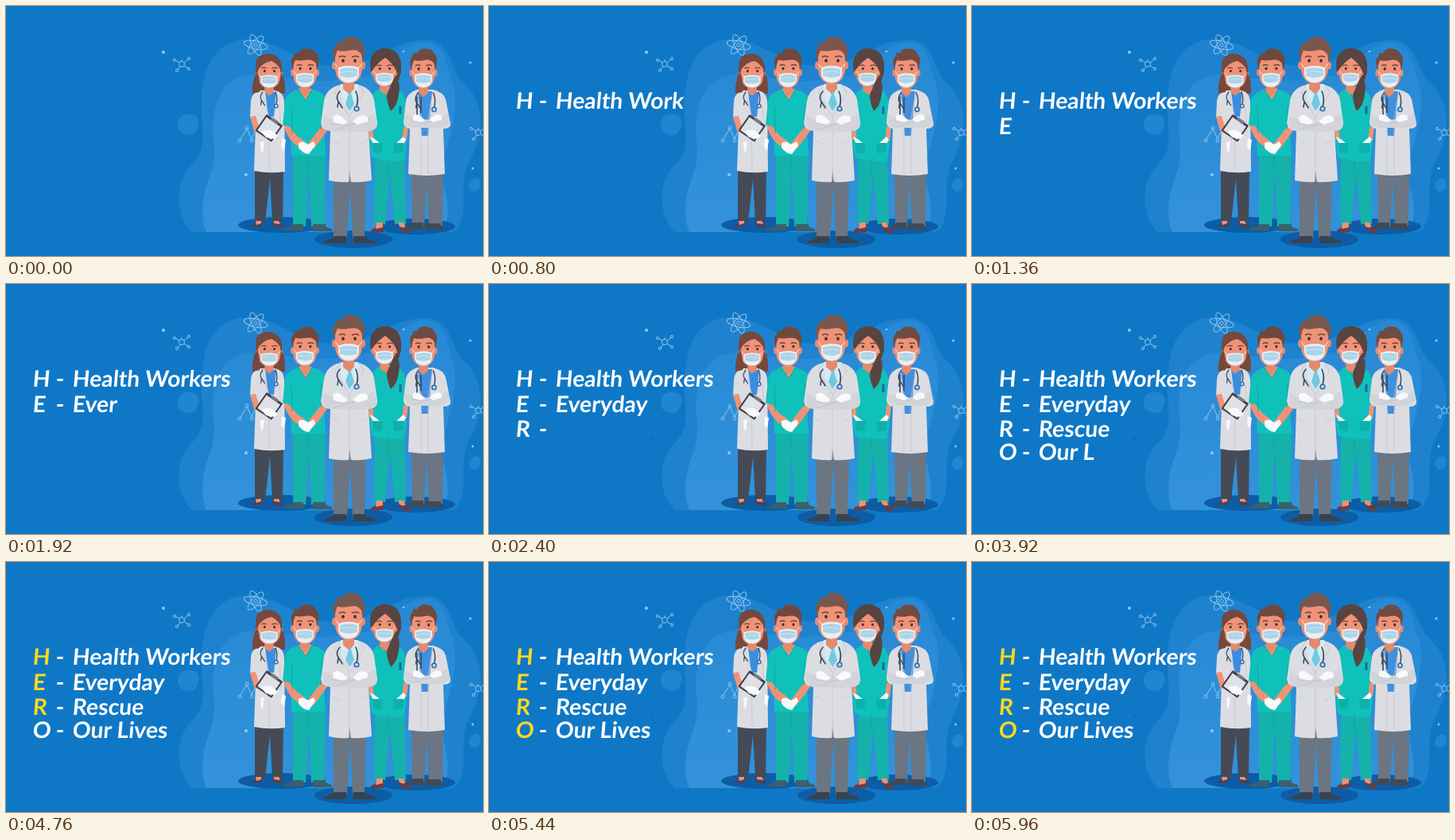
An HTML page that plays this animation: 600x314 px, repeating every 6 s.

```html
<!DOCTYPE html>
<html lang="en">
<head>
<meta charset="utf-8">
<title>Health Workers</title>
<style>
html, body { margin: 0; width: 100%; height: 100%; overflow: hidden; background: #0f78c6; }
svg { display: block; width: 100vw; height: 100vh; }
#lines { font: bold 28.4px Lato, "Open Sans", sans-serif; fill: #fff; }
.skin { fill: #f09277; }
.coat { fill: #dcdde2; }
.fold { fill: #d2d4da; }
.teal { fill: #10c1bb; }
.trouser { fill: #14b2ab; }
.grey { fill: #6c7582; }
.dark { fill: #454a57; }
.glove { fill: #f8f9fb; }
.line { fill: none; stroke: #8fc5ec; stroke-width: 1; }
.scope { fill: none; stroke: #34495f; stroke-width: 1.6; stroke-linecap: round; }
.seam { fill: none; stroke: #c3c5ce; stroke-width: .8; }
.crease { fill: none; stroke: #0da5a0; stroke-width: .9; }
</style>
</head>
<body>
<svg viewBox="0 0 600 314">
<defs>
  <g id="mask">
    <path d="M-13 41Q0 36 13 41V50Q10 60 0 60Q-10 60 -13 50Z" fill="#e6f0f5"/>
    <path d="M-11 43Q0 39 11 43V51Q0 56 -11 51Z" fill="#add3e7"/>
    <path d="M-11 47Q0 44 11 47" fill="none" stroke="#cfe5f0"/>
    <path d="M-17 36L-12 42M17 36L12 42" stroke="#eef3f6"/>
  </g>
  <g id="eyes" fill="#40302d">
    <ellipse cx="-7" cy="32" rx="1.8" ry="2.2"/><ellipse cx="8" cy="32" rx="1.8" ry="2.2"/>
    <path d="M-12 27.5Q-8 25 -4 27.5M4 27.5Q9 25 13 27.5" fill="none" stroke="#6b463c" stroke-width="1.6"/>
  </g>
  <g id="face">
    <path d="M-7 52H7V68L0 74L-7 68Z" fill="#e38b6c"/>
    <ellipse cx="-18" cy="38" rx="3" ry="5" fill="#e98a6e"/>
    <ellipse cx="18" cy="38" rx="3" ry="5" fill="#e98a6e"/>
    <path class="skin" d="M-17 17V43Q-15 61 0 61Q15 61 17 43V17Q0 8 -17 17Z"/>
    <use href="#eyes"/><use href="#mask"/>
  </g>
  <g id="man">
    <use href="#face"/>
    <path d="M-18 34L-20 23Q-20 16 -16 13L-15 8L-10 9Q-4 0 4 2Q13 2 16 9Q22 15 20 24L18 34L16 24Q11 17 2 19Q-9 21 -14 19Q-17 25 -18 34Z" fill="currentColor"/>
  </g>
  <g id="molecule" class="line">
    <circle r="3.5"/>
    <path d="M-3 -2L-8 -5M3 -2L8 -6M3 2L8 5M-2 3L-5 7M0 -3.5V-6"/>
    <circle cx="-9" cy="-5" r="1.6"/><circle cx="9" cy="-7" r="1.6"/>
    <circle cx="9" cy="6" r="1.6"/><circle cx="-6" cy="8" r="1.6"/>
  </g>
  <g id="scope">
    <path class="scope" d="M-10 0Q-16 7 -12 13T-7 21M-12 13L-13 20M10 0Q14 9 11 20"/>
    <circle cx="11" cy="22" r="3.6" fill="#2c68a8"/><circle cx="11" cy="22" r="2" fill="#b9ddf2"/>
  </g>
  <g id="bentArms">
    <path class="fold" d="M-32 -5Q-37 11 -23 14L16 15Q35 14 35 3L31 -8Q18 2 0 2Q-16 2 -32 -5Z"/>
    <path class="seam" d="M-23 4Q-3 11 19 1M-20 13L10 4"/>
    <path class="glove" d="M-21 -3Q-17 -9 -10 -4L-2 3L-8 6L-20 3ZM23 -3Q18 -8 11 -4L4 2L10 6L23 2Z"/>
  </g>
  <linearGradient id="pale" x1="0" y1="0" x2="0" y2="1">
    <stop stop-color="#2689d5"/><stop offset="1" stop-color="#3392da"/>
  </linearGradient>
</defs>

<rect width="600" height="314" fill="#0f78c6"/>
<path d="M234 284C211 262 212 220 235 198C260 174 238 139 249 93C256 55 283 39 310 42C350 46 369 78 421 75C467 72 486 42 530 43C561 45 559 80 573 94C604 119 601 161 585 191C568 222 581 248 572 270Q568 284 557 284Z" fill="#1e82cf"/>
<path d="M252 284C242 259 249 233 257 211C269 178 254 158 264 125C272 92 300 82 332 87C385 98 429 95 465 85C490 64 505 45 530 46C557 50 554 82 563 98C572 150 545 186 549 215C553 240 562 260 549 284Z" fill="url(#pale)"/>
<path d="M216 148Q218 134 232 136Q244 137 242 149Q239 164 230 162Q215 160 216 148ZM582 226Q584 216 592 216Q600 220 595 230Q586 238 582 226Z" fill="#2185d1"/>
<g fill="#91c8ef">
  <circle cx="198" cy="58" r="2"/><circle cx="302" cy="212" r="2"/>
  <circle cx="584" cy="71" r="1.6"/><circle cx="500" cy="57" r="1.3"/><circle cx="587" cy="204" r="1.4"/>
</g>
<g fill="#285f91"><circle cx="186" cy="94" r="1"/><circle cx="204" cy="194" r="1.5"/></g>
<use href="#molecule" x="221" y="73"/><use href="#molecule" x="594" y="159"/>
<g class="line" transform="translate(314 49)">
  <ellipse rx="15" ry="5" transform="rotate(12)"/>
  <ellipse rx="14" ry="5" transform="rotate(67)"/>
  <ellipse rx="14" ry="5" transform="rotate(130)"/>
  <circle r="2.2"/>
</g>
<g class="line">
  <path d="M295 167L303 154L309 167L316 151"/>
  <circle cx="294" cy="169" r="2"/><circle cx="303" cy="153" r="2"/><circle cx="309" cy="169" r="2"/>
</g>
<g fill="#0c5da5">
  <ellipse cx="347" cy="275" rx="55" ry="10"/><ellipse cx="515" cy="277" rx="50" ry="10"/>
  <ellipse cx="437" cy="293" rx="49" ry="11"/>
</g>

<!-- Woman with clipboard -->
<path d="M315 80Q311 61 329 60Q348 61 347 82Q353 99 350 110H310Q309 98 315 80Z" fill="#75493e"/>
<path class="dark" d="M313 202H349L348 271H335L332 217L326 271H313Z"/>
<path d="M308 276Q315 274 316 270L322 271V277H308ZM336 270L342 271Q343 274 349 275V278L336 277Z" fill="#5a3c42"/>
<path class="skin" d="M314 270H321V273L315 275ZM337 270H343L345 274L337 273Z"/>
<path class="coat" d="M321 106Q309 108 308 120L307 140L314 148L312 207Q331 211 351 208L350 122Q350 108 338 106Z"/>
<path d="M326 108L340 108L337 139H330Z" fill="#3a8ee0"/>
<path class="seam" d="M322 108L330 137L331 207M340 108L338 137M344 126L346 159"/>
<g transform="translate(331 58) scale(.82 .74)"><use href="#face"/></g>
<path d="M314 84Q313 62 330 60Q348 62 347 84Q344 74 334 69Q322 71 316 82Z" fill="#75493e"/>
<path d="M316 82Q320 92 319 108L310 110Q310 95 316 82ZM346 82Q344 96 347 109L351 110Q351 96 346 82Z" fill="#75493e"/>
<use href="#scope" transform="translate(331 108) scale(.8)"/>
<path class="skin" d="M307 139L314 138L318 151L327 156L323 163L312 157Z"/>
<g transform="translate(331 154) rotate(35)">
  <rect x="-13" y="-13" width="25" height="25" rx="1" fill="#3d414d"/>
  <rect x="-11" y="-10" width="21" height="20" fill="#dfe1e7"/>
  <rect x="-5" y="-14" width="10" height="4" fill="#737987"/>
</g>
<path class="glove" d="M321 158Q329 154 335 157L342 163L337 167L327 165ZM320 171L325 170L323 184H321ZM347 166L352 168L350 182L346 177Z"/>

<!-- Man in scrubs -->
<path class="trouser" d="M361 184H402L400 277H384L381 207L377 277H361Z"/>
<path d="M349 280Q360 277 362 274H374V282H349ZM386 274H399Q402 278 410 280V283H386Z" fill="#3d5f6b"/>
<path class="teal" d="M368 105Q353 109 351 119L348 149L358 154L359 188H402L400 155L406 155L403 119Q401 108 385 105L377 117Z"/>
<path class="skin" d="M368 104L377 118L385 104ZM349 150L356 151L366 163L376 170L372 178Q357 174 349 150ZM397 151L406 154L387 180L379 174Z"/>
<path class="crease" d="M368 106L377 119L385 106M359 126L360 160M397 125L396 155M380 188V208"/>
<path class="glove" d="M368 172Q374 168 380 174L387 170L389 175L381 186Q373 185 368 178Z"/>
<g color="#71483d"><use href="#man" transform="translate(376 52) scale(.86 .83)"/></g>

<!-- Woman in scrubs -->
<path class="trouser" d="M464 190H501L503 274H489L483 210L477 274H463Z"/>
<path d="M459 281Q467 278 467 273H475V284H459ZM492 273H500Q502 279 509 282V285H500Z" fill="#6b3c44"/>
<path class="skin" d="M466 272H474V278L465 280ZM493 272H500L504 280L495 277Z"/>
<path class="teal" d="M474 102Q460 107 458 119L456 161L460 190Q479 197 501 194L506 155L502 118Q500 107 488 102Z"/>
<path class="skin" d="M474 102L481 118L488 102ZM456 151L461 152L463 171L457 167ZM500 152L506 152L504 168L498 171Z"/>
<path class="glove" d="M458 164L465 168L472 174L464 178ZM490 173L500 164L503 168L497 178Z"/>
<path d="M461 172L474 172L472 185L462 184ZM487 172L500 172V184L488 185Z" fill="#0fb0ab"/>
<path class="crease" d="M474 104L480 119L488 104M481 191V212"/>
<path d="M496 126V136" stroke="#2463a5" stroke-width="3"/>
<path d="M459 82Q454 56 476 53Q499 54 497 82L494 93H465Z" fill="#584440"/>
<g transform="translate(476 54) scale(.82 .77)"><use href="#face"/></g>
<path d="M459 83Q456 57 475 53Q498 53 497 83L493 91Q492 76 477 65Q469 70 463 78Z" fill="#584440"/>
<path d="M489 89Q497 94 494 111Q492 126 484 132Q479 122 479 111Z" fill="#584440"/>

<!-- Young doctor -->
<path class="grey" d="M510 207H550L549 276H532L529 218L526 276H511Z"/>
<path d="M500 278Q510 276 512 272H525V280H500ZM527 273H547V277Q550 278 550 281H527Z" fill="#414955"/>
<path class="coat" d="M517 105Q505 109 503 119L500 145Q500 153 508 154L506 211Q529 215 552 211L550 154Q560 154 559 147L553 117Q550 108 537 105Z"/>
<path d="M518 107L536 107L531 163H523Z" fill="#4090de"/>
<path class="seam" d="M517 107L522 138V211M537 107L531 142V211"/>
<use href="#bentArms" transform="translate(529 141) scale(.83)"/>
<use href="#scope" transform="translate(528 109) scale(.95)"/>
<path d="M517 114V136M522 115V134" class="scope"/>
<g color="#704b3f"><use href="#man" transform="translate(525 52) scale(.84)"/></g>

<!-- Lead doctor -->
<path class="grey" d="M412 211H453L451 291H436L433 224L429 291H412Z"/>
<path d="M401 295Q412 292 413 289H428V298H401ZM437 289H451Q454 293 465 295V298H437Z" fill="#39424e"/>
<path class="coat" d="M420 99Q403 103 400 119L396 147Q397 156 408 157L406 219Q418 222 431 221L432 207L434 221Q448 222 460 219L456 157Q468 156 467 146L463 118Q460 104 444 99Z"/>
<path d="M421 98H443L440 120L432 134L423 119Z" fill="#d2ebf5"/>
<path d="M429 105H436L434 110L438 123L432 132L427 123L431 110Z" fill="#73c8df"/>
<path class="seam" d="M420 99L414 109L432 139V220M444 99L450 109L432 139M411 169L420 174M453 169L443 174"/>
<use href="#bentArms" x="432" y="143"/>
<use href="#scope" transform="translate(430 107)"/>
<g color="#79574e"><use href="#man" transform="translate(431 37) scale(1 .99)"/></g>
<g id="lines"></g>
</svg>
<script>
// initial, word, baseline, typing start, ms per character, highlight time
const rows = [
  ["H", "Health Workers", 129, 20, 54, 4280],
  ["E", "Everyday", 161, 1265, 84, 4480],
  ["R", "Rescue", 192, 2190, 95, 4680],
  ["O", "Our Lives", 220.5, 3180, 88, 4880]
];
const group = document.getElementById("lines");
function addText(x, y) {
  const node = document.createElementNS("http://www.w3.org/2000/svg", "text");
  node.setAttribute("transform", `translate(${x} ${y}) skewX(-5)`);
  return group.appendChild(node);
}
const parts = rows.map(row => [33, 62, 83].map(x => addText(x, row[2])));
const origin = performance.now();
function draw() {
  const t = (performance.now() - origin) % 6000;
  rows.forEach(([initial, word, , start, pace, glow], i) => {
    const typed = Math.max(0, Math.ceil((t - start) / pace));
    const [letter, dash, rest] = parts[i];
    letter.textContent = typed > 0 ? initial : "";
    letter.setAttribute("fill", t >= glow ? "#fcd91b" : "#fff");
    dash.textContent = typed > 2 ? "-" : "";
    rest.textContent = word.slice(0, Math.max(0, typed - 4));
  });
  requestAnimationFrame(draw);
}
draw();
</script>
</body>
</html>
```
